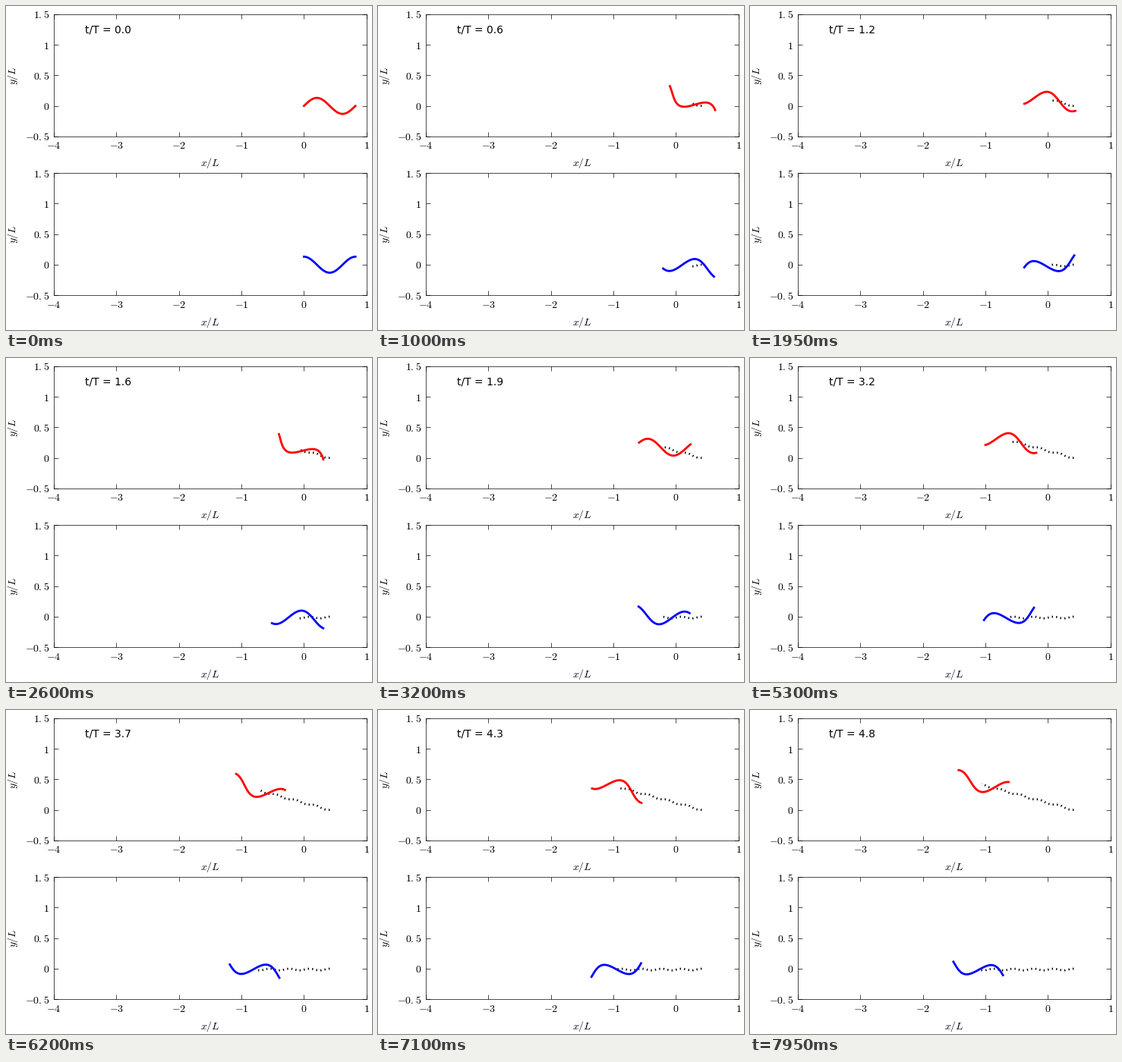
Animation of 482x427 px, one loop 8000 ms. Source, as a matplotlib script:

```python
import numpy as np
import matplotlib.pyplot as plt
from matplotlib.animation import FuncAnimation

W, H, DPI = 482, 427, 100
FRAMES, INTERVAL = 160, 50
DT = 0.03                       # periods per frame

WAVELEN = 0.8224                # one full wave on a body of unit length
K = 2 * np.pi / WAVELEN
AMP = 1 / K
SPEED = 0.321                   # body lengths per period
YAW = np.radians(15.7)
BOB = 0.0135

plt.rcParams.update({
    "toolbar": "None",
    "font.family": "DejaVu Sans",
    "font.size": 10,
    "mathtext.fontset": "cm",
    "axes.linewidth": 0.5,
})


def center(t, lead):
    """Body centre after t periods, for a given initial wave phase."""
    phase = 2 * np.pi * t - lead
    heading = YAW * np.cos(lead)
    along = SPEED * t
    side = -BOB * (np.sin(phase) + np.sin(lead))
    x = WAVELEN / 2 - along * np.cos(heading) + side * np.sin(heading)
    y = along * np.sin(heading) + side * np.cos(heading)
    return x, y


def body(t, lead):
    """Travelling sine wave, yawed about the body centre."""
    phase = 2 * np.pi * t - lead
    tilt = YAW * (np.cos(lead) - np.cos(phase))
    s = np.linspace(0, WAVELEN, 120)
    u = s - WAVELEN / 2
    v = AMP * np.sin(K * s - phase)
    cx, cy = center(t, lead)
    return (cx + u * np.cos(tilt) + v * np.sin(tilt),
            cy - u * np.sin(tilt) + v * np.cos(tilt))


fig = plt.figure(figsize=((W + 0.01) / DPI, (H + 0.01) / DPI), dpi=DPI,
                 facecolor="white")


def panel(bottom, color, lead):
    ax = fig.add_axes([62.8 / W, bottom / H, 412 / W, 161 / H])
    ax.set(xlim=(-4, 1), ylim=(-0.5, 1.5))
    ax.set_xticks(range(-4, 2), [f"${n}$" for n in range(-4, 2)])
    ax.set_yticks([-0.5, 0, 0.5, 1, 1.5],
                  ["$-0.{5}$", "$0$", "$0.{5}$", "$1$", "$1.{5}$"])
    ax.tick_params(direction="in", length=4, width=0.5, pad=4,
                   top=True, right=True)
    fig.text(269 / W, (bottom - 35.4) / H, "$x/L$", ha="center", va="center")
    fig.text(9 / W, (bottom + 80.5) / H, "$y/L$", rotation=90,
             ha="center", va="center")
    trail, = ax.plot([], [], color="black", lw=2, dashes=(0.5, 1.5))
    wave, = ax.plot([], [], color=color, lw=2)
    return ax, trail, wave, lead


panels = [panel(255.1, "#ff0000", 0), panel(45.8, "#0000ff", np.pi / 2)]
clock = panels[0][0].text(-3.5, 1.19, "")


def update(i):
    times = DT * np.arange(i + 1)
    clock.set_text(f"t/T = {i * DT:.1f}")
    for _, trail, wave, lead in panels:
        trail.set_data(*center(times, lead))
        wave.set_data(*body(times[-1], lead))
    return [clock]


anim = FuncAnimation(fig, update, frames=FRAMES, interval=INTERVAL,
                     init_func=lambda: update(0), repeat=True, repeat_delay=0)
plt.show()
```
